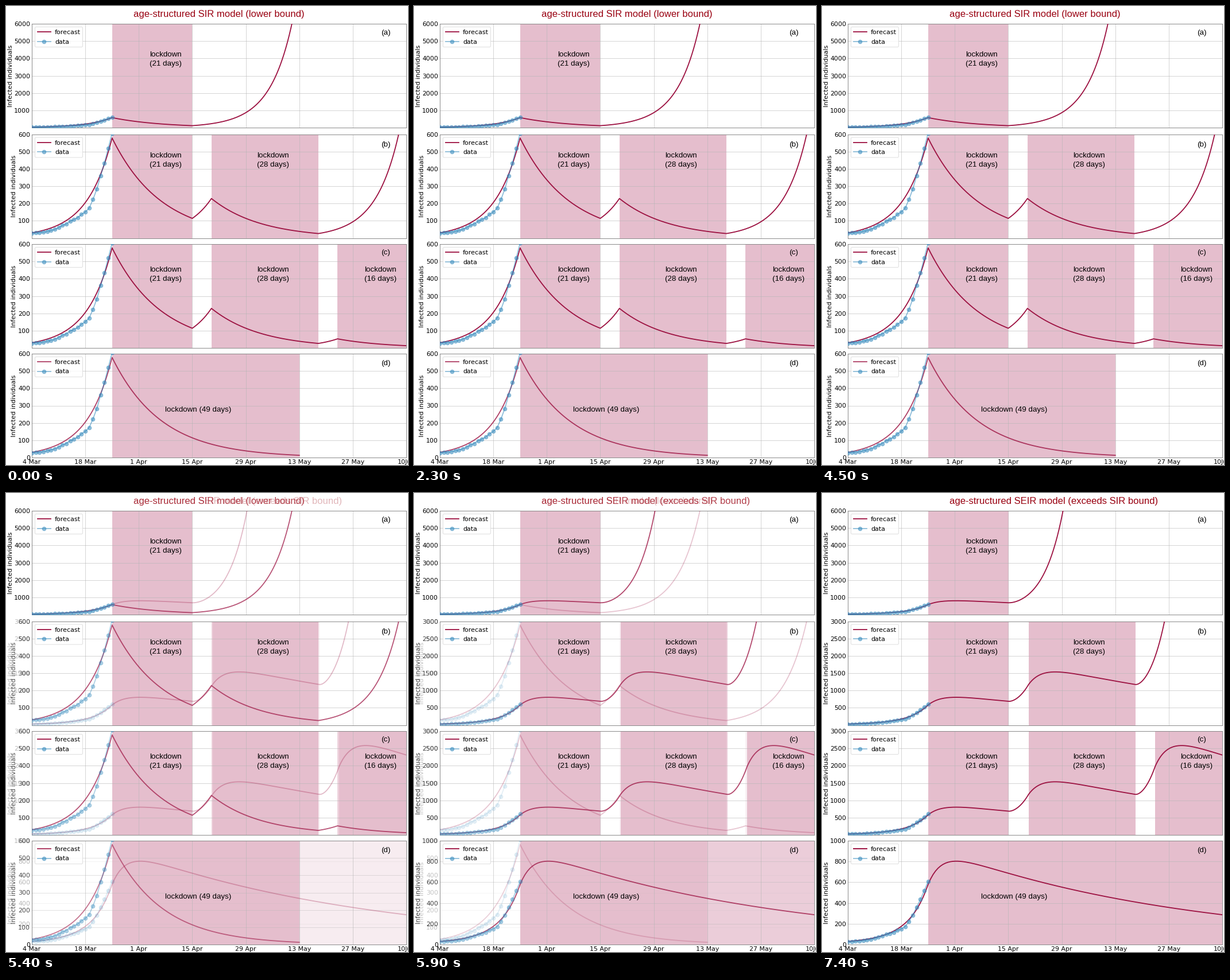
Recreate the animation shown at these times as a matplotlib script. Size 700 px wide and 800 px high, loop 8000 ms.

```python
import numpy as np
import matplotlib.pyplot as plt
from matplotlib.animation import FuncAnimation
from matplotlib.patches import FancyBboxPatch

W, H, DPI = 700, 800, 100
FRAMES, STEP = 80, 100
FADE_START, FADE_TIME = 5100, 1050

LEFT, RIGHT, HEIGHT = 45, 697, 181
TOPS = [31, 223.5, 415, 606]
DAYS = 98
WINE, BLUE, SHADE = "#9c1040", "#348abd", "#e5becd"
PT = 72 / DPI

CASES = [28, 30, 31, 34, 39, 44, 50, 60, 73, 81, 97, 107, 118, 137,
         151, 173, 223, 283, 360, 434, 519, 606]

fig = plt.figure(figsize=(W / DPI, H / DPI), dpi=DPI, facecolor="white")
page = fig.add_axes([0, 0, 1, 1], zorder=2)
page.set(xlim=(0, W), ylim=(H, 0))
page.axis("off")

faders = []  # (artist, full alpha, model): model 0 fades out, 1 fades in


def fade(artist, model, alpha=1.0):
    if model is not None:
        faders.append((artist, alpha, model))
    return artist


def label(x, y, text, size=11, font="DejaVu Sans", model=None, **kw):
    kw = {"ha": "center", "va": "baseline", "color": "black"} | kw
    return fade(page.text(x, y, text, fontsize=size * PT, family=font, **kw), model)


def sans(x, y, text, **kw):
    return label(x, y, text, font="Liberation Sans", **{"size": 13.4} | kw)


# Growth and lockdown rules: factor relative to the value at the phase start
def rise(rate, bend):
    return lambda t: np.exp(rate * t + bend * t * t)


def delayed_rise(t):
    return np.exp(0.19 * t - 0.535 * (1 - np.exp(-t / 2.8)))


def decay(t):
    return np.exp(-0.0774 * t)


def overshoot(ratio):
    return lambda t: ratio * np.exp(-0.0156 * t) - (ratio - 1) * np.exp(-0.28 * t)


def chain(start, phases):
    """Join phases (end day, rule) into one curve."""
    xs, ys, day, value = [], [], 0, start
    for end, rule in phases:
        t = np.linspace(0, end - day, 120)
        xs.append(day + t)
        ys.append(value * rule(t))
        day, value = end, ys[-1][-1]
    return np.concatenate(xs), np.concatenate(ys)


regrow, hump = rise(0.1365, 0.0006), overshoot(1.547)
sir_start = [(21, rise(0.1304, 0.0005))]
seir_start = [(21, rise(0.0968, 0.0021))]
sir_first = sir_start + [(42, decay)]
seir_first = seir_start + [(42.1, overshoot(1.65))]
sir_second = sir_first + [(47, regrow), (75, decay)]
seir_second = seir_first + [(47.3, delayed_rise), (75.3, hump)]

SIR = [
    sir_first + [(DAYS, regrow)],
    sir_second + [(DAYS, regrow)],
    sir_second + [(80, regrow), (DAYS, decay)],
    sir_start + [(70, decay)],
]
SEIR = [
    seir_first + [(DAYS, delayed_rise)],
    seir_second + [(DAYS, delayed_rise)],
    seir_second + [(80.4, delayed_rise), (DAYS, hump)],
    seir_start + [(DAYS, overshoot(1.65))],
]
LIMITS = [(6000, 6000), (600, 3000), (600, 3000), (600, 1000)]
TICKS = [(1000, 1000), (100, 500), (100, 500), (100, 200)]

# Lockdown spans as ((start, end) in SIR, (start, end) in SEIR)
FIRST = ((21, 42), (21, 42.1))
SECOND = ((47, 75), (47.3, 75.3))
THIRD = ((80, DAYS), (80.4, DAYS))
SPANS = [[FIRST], [FIRST, SECOND], [FIRST, SECOND, THIRD], [((21, 70), (21, DAYS))]]


def shade(ax, span):
    (a0, a1), (b0, b1) = span
    ax.axvspan(max(a0, b0), min(a1, b1), fc=SHADE, lw=0, zorder=0)
    for lo, hi, model in [(a0, b0, 0), (b0, a0, 1), (b1, a1, 0), (a1, b1, 1)]:
        if lo < hi:
            fade(ax.axvspan(lo, hi, fc=SHADE, lw=0, zorder=0), model)


def legend(top, alpha):
    page.add_patch(FancyBboxPatch((52.5, top + 7.5), 79, 31, boxstyle="round,pad=2",
                                  fc=(1, 1, 1, 0.8), ec="#dcdcdc", lw=0.9 * PT))
    y1, y2 = top + 14, top + 30.5
    page.plot([54.5, 77.5], [y1, y1], color=WINE, lw=1.8 * PT, alpha=alpha)
    if alpha < 1:
        fade(page.plot([54.5, 77.5], [y1, y1], color=WINE, lw=1.8 * PT)[0], 1)
    page.plot([54.5, 66, 77.5], [y2] * 3, "o-", markevery=[1], alpha=0.55, **data_style)
    label(85, y1 + 4, "forecast", ha="left")
    label(85, y2 + 4, "data", ha="left")


data_style = dict(color=BLUE, lw=1.8 * PT, ms=6.6 * PT, mew=0.9 * PT)
grid_style = dict(color="#b4b4b4", lw=0.8 * PT, zorder=1)


def panel(i):
    top = TOPS[i]
    ax = fig.add_axes([LEFT / W, 1 - (top + HEIGHT) / H, (RIGHT - LEFT) / W, HEIGHT / H])
    ax.set(xlim=(0, DAYS), ylim=(0, 1), xticks=[], yticks=[])
    for spine in ax.spines.values():
        spine.set(color="#808080", lw=0.9 * PT)
    for span in SPANS[i]:
        shade(ax, span)
    for day in range(14, DAYS, 14):
        ax.axvline(day, alpha=0.7, **grid_style)

    same_scale = LIMITS[i][0] == LIMITS[i][1]
    for model, phases in enumerate((SIR[i], SEIR[i])):
        limit, tick = LIMITS[i][model], TICKS[i][model]
        weak = 0.8 if i == 3 and model == 0 else 1
        x, y = chain(30, phases)
        line, = ax.plot(x, y / limit, color=WINE, lw=1.8 * PT, zorder=3)
        fade(line, model, weak)
        if same_scale and model:
            continue
        owner = None if same_scale else model
        dots, = ax.plot(range(len(CASES)), np.array(CASES) / limit, "o-",
                        alpha=0.55, zorder=4, **data_style)
        fade(dots, owner, 0.55)
        for v in range(tick, limit + 1, tick):
            y_px = top + HEIGHT * (1 - v / limit)
            shared = owner if v < limit and i == 3 else None
            if v < limit and (i == 3 or model == 0):
                fade(ax.axhline(v / limit, alpha=0.7, **grid_style), shared, 0.7)
            label(42, y_px + 4, str(v), ha="right", model=owner)
        base = 11 if same_scale or model else 17
        label(base, top + HEIGHT / 2, "Infected individuals", rotation=90,
              rotation_mode="anchor", model=owner)
    legend(top, 0.8 if i == 3 else 1)


for i in range(4):
    panel(i)

label(42, 791, "0", ha="right")
dates = ["4 Mar", "18 Mar", "1 Apr", "15 Apr", "29 Apr", "13 May", "27 May", "10Jun"]
for k, date in enumerate(dates):
    label(LEFT + k * (RIGHT - LEFT) / 7, 798.5, date)

for name, y in zip("abcd", (50, 245, 433, 626)):
    sans(661, y, f"({name})")
for y, notes in [(88, [(278, 21)]), (264.5, [(278, 21), (465, 28)]),
                 (463, [(278, 21), (465, 28), (652, 16)])]:
    for x, days in notes:
        sans(x, y, "lockdown")
        sans(x, y + 15.8, f"({days} days)")
sans(334.5, 707, "lockdown (49 days)")

for model, text in enumerate(["age-structured SIR model (lower bound)",
                              "age-structured SEIR model (exceeds SIR bound)"]):
    sans(221.5, 19.5, text, size=16.65, ha="left", color="#990010", model=model)


def update(frame):
    mix = np.clip((frame * STEP - FADE_START) / FADE_TIME, 0, 1)
    for artist, alpha, model in faders:
        artist.set_alpha(alpha * (mix if model else 1 - mix))
    return [artist for artist, _, _ in faders]


anim = FuncAnimation(fig, update, frames=FRAMES, interval=STEP,
                     repeat=True, repeat_delay=0, blit=False)
plt.show()
```
